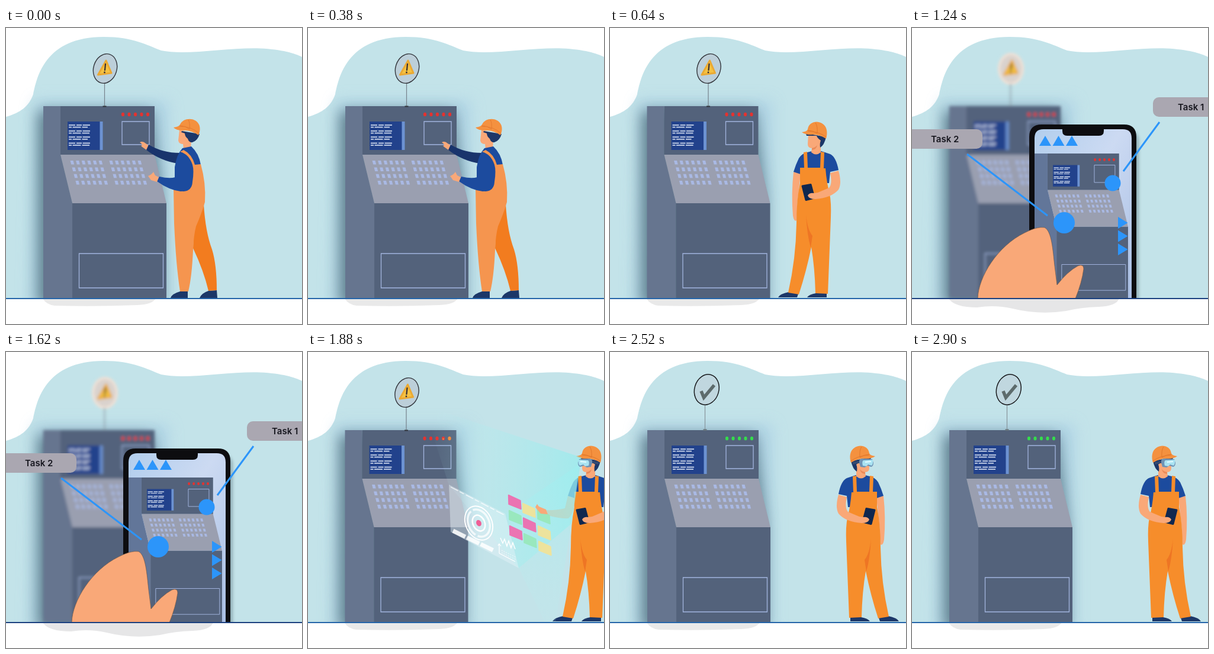
These frames come from a looping animation (500x500 px, 3160 ms). An HTML page:

```html
<!DOCTYPE html>
<html lang="en">
<head>
<meta charset="utf-8">
<title>Machine maintenance</title>
<style>
html, body { margin: 0; width: 100%; height: 100%; overflow: hidden; background: #fff; }
svg { display: block; width: 100vw; height: 100vh; }
.scene { visibility: hidden; animation: 3160ms step-end infinite; }
.operate { animation-name: operate; }
.inspect { animation-name: inspect; }
.phone { animation-name: phone; }
.headset { animation-name: headset; }
.done { animation-name: done; }
/* cuts at 640, 1240, 1880 and 2520 ms */
@keyframes operate { 0% { visibility: visible } 20.2532%, 100% { visibility: hidden } }
@keyframes inspect { 0% { visibility: hidden } 20.2532% { visibility: visible } 39.2405%, 100% { visibility: hidden } }
@keyframes phone { 0% { visibility: hidden } 39.2405% { visibility: visible } 59.4937%, 100% { visibility: hidden } }
@keyframes headset { 0% { visibility: hidden } 59.4937% { visibility: visible } 79.7468%, 100% { visibility: hidden } }
@keyframes done { 0% { visibility: hidden } 79.7468%, 100% { visibility: visible } }
.red { color: #e5322f; }
.green { color: #35dc4c; }
.skin { fill: #f9a878; }
.navy { fill: #1c3768; }
.shirt { fill: #1c4b9e; }
.suit { fill: #f68d2b; }
.cap { fill: #f4913f; }
.accent { fill: #2c95fa; }
text { font: 600 15px Inter, "Open Sans", sans-serif; fill: #17171f; }
</style>
</head>
<body>
<svg viewBox="0 0 500 500">
<defs>
  <filter id="soft" x="-50%" y="-50%" width="200%" height="200%"><feGaussianBlur stdDeviation="12"/></filter>
  <filter id="blur" x="-20%" y="-20%" width="140%" height="140%"><feGaussianBlur stdDeviation="2.6"/></filter>
  <clipPath id="above"><path d="M0 0H500V456H0Z"/></clipPath>
  <clipPath id="display"><path d="M207 456V186Q207 171 222 171H356Q371 171 371 186V456Z"/></clipPath>
  <linearGradient id="glass" x2="1" y2="1"><stop stop-color="#b2ceed"/><stop offset=".45" stop-color="#ccdaf2"/><stop offset="1" stop-color="#a9bfe4"/></linearGradient>
  <linearGradient id="beam" gradientUnits="userSpaceOnUse" x1="462" y1="185" x2="205" y2="160">
    <stop stop-color="#8deeee" stop-opacity=".62"/><stop offset="1" stop-color="#b5f0f0" stop-opacity="0"/>
  </linearGradient>
  <linearGradient id="spill" gradientUnits="userSpaceOnUse" x1="458" y1="190" x2="385" y2="445">
    <stop stop-color="#9ceff0" stop-opacity=".5"/><stop offset="1" stop-color="#b8f0f0" stop-opacity=".12"/>
  </linearGradient>

  <g id="shadow" clip-path="url(#above)">
    <path d="M48 122H275V470H40Z" fill="#a9cfe4" opacity=".7" filter="url(#soft)"/>
    <path d="M54 140H245L262 290V470H54Z" fill="#40616d" opacity=".75" filter="url(#soft)"/>
  </g>
  <path id="base" d="M62 457H253Q247 467 222 468Q150 471 82 469Q68 467 62 457Z" fill="#e9e9e9"/>

  <g id="keys" fill="none" stroke="#a9b9e4" stroke-width="6.4" stroke-dasharray="5 4.6">
    <path d="M0 3.3H53M0 14.7H53M0 26H53M0 37.3H53"/>
  </g>
  <g id="machine">
    <path d="M63 132H92V214L112 296V456H63Z" fill="#66758f"/>
    <path d="M92 132H251V214H92ZM112 296H271V456H112Z" fill="#53627b"/>
    <path d="M92 214H251L271 296H112Z" fill="#9a9fb0"/>
    <path d="M104 158H159V206H104Z" fill="#22428c"/>
    <path d="M158.500 158H163.500V206H158.500Z" fill="#6c92d2"/>
    <g stroke="#e8effc" stroke-width="1.6" fill="none">
      <path d="M106 164H142M106 174H142M106 184.300H142M106 194.500H142" stroke-dasharray="11 2 9 1.500 12.500 0"/>
      <path d="M106 167.500H138M106 177.500H141M106 187.700H138M106 198H141" stroke-dasharray="5 1.500 14 2 12.500 0"/>
    </g>
    <g fill="none" stroke="#a3b5df" stroke-width="1.3">
      <path d="M196 158H242V197H196ZM123.500 381H265.500V439H123.500Z"/>
    </g>
    <g fill="currentColor">
      <ellipse cx="197.500" cy="146" rx="2.600" ry="3.300"/><ellipse cx="208" cy="146" rx="2.600" ry="3.300"/>
      <ellipse cx="218.500" cy="146" rx="2.600" ry="3.300"/><ellipse cx="229" cy="146" rx="2.600" ry="3.300"/>
      <ellipse cx="239.500" cy="146" rx="2.600" ry="3.300"/>
    </g>
    <g transform="translate(108.500 224) skewX(14.700)"><use href="#keys"/><use href="#keys" x="66"/></g>
  </g>

  <g id="sign">
    <path d="M166.500 94V132" stroke="#75808a" stroke-width="1.2"/>
    <path d="M163.500 132.500H169.500" stroke="#30343c" stroke-width="2"/>
    <ellipse cx="167.500" cy="68.500" rx="19.600" ry="25.300" transform="rotate(17 167.500 68.500)" fill="#bccfd9" stroke="#33363c" stroke-width="1.4"/>
  </g>
  <g id="warning">
    <path d="M169 55L178 76L155.500 79Z" fill="#f5c242" stroke="#eba932" stroke-width="3" stroke-linejoin="round"/>
    <path d="M168 61L167 71" stroke="#3a3034" stroke-width="2.300" stroke-linecap="round"/>
    <circle cx="166.500" cy="75" r="1.400" fill="#3a3034"/>
  </g>
  <g id="faulty">
    <use href="#base"/><use href="#shadow"/><use href="#machine"/><use href="#sign"/><use href="#warning"/>
  </g>
  <path id="floor" d="M0 457H500" stroke="#2565a9" stroke-width="2"/>

  <path id="arm" class="skin" d="M310 243Q306 280 309 317Q311 328 315 325Q317 312 316 300L322 246Z"/>
  <g id="worker">
    <path class="navy" d="M284 455Q287 449 302 446L318 449L316 455ZM333 455Q336 450 348 448L366 448V455Z"/>
    <path class="shirt" d="M341 208Q324 211 319 220Q314 230 310 243L322 247V262H370L372 243L386 240Q382 218 372 213L357 208Z"/>
    <path class="skin" d="M335 180L334 196Q334 203 341 203L340 210Q348 217 356 210V199Q363 191 355 188L349 181Z"/>
    <path d="M341 203Q347 202 350 198Q349 205 341 206Z" fill="#ea8a58"/>
    <path class="navy" d="M331 178L365 184Q362 198 355 202Q354 195 356 190Q350 186 349 182L332 182Z"/>
    <path class="suit" d="M327 210L333 209L334 236H355L356 209L362 210L361 237H364Q366 262 371 280Q374 295 373 320L368 449L347 448Q346 405 340 370Q332 410 319 450L301 447Q314 390 315 330Q315 290 321 262V236H328Z"/>
    <path d="M331 316Q333 350 339 371L342 351Q334 342 331 316Z" fill="#ee7524"/>
    <path class="cap" d="M324 176Q333 175 334 171C336 158 350 156 358 161C367 166 368 177 365 187Q354 180 343 180Q330 181 324 176Z"/>
    <path d="M334 173Q342 173 350 178Q351 166 347 160M334 174Q353 175 365 184" fill="none" stroke="#e2782c"/>
    <path d="M325 267L339 264.500L345 287L331 290.500Z" fill="#10284f" stroke="#10284f" stroke-width="3" stroke-linejoin="round"/>
    <path class="skin" d="M372 245L386 241Q392 262 386 273Q374 287 347 289Q336 289 334 283Q337 278 344 279L351 278L370 270Q376 263 372 245Z"/>
  </g>
  <g id="visor">
    <path d="M348 185L362 188" stroke="#344b72" stroke-width="4"/>
    <path d="M329 181L347 180Q352 181 351 187L349 194L342 195L337 192L331 194Q327 193 327 187Z" fill="#6e93b5"/>
    <path d="M328 182L344 183Q347 185 345 192L339 193L336 190L330 192Q327 189 328 182Z" fill="#a9e3f2"/>
    <path d="M331 185L341 186" stroke="#e4fbff" stroke-width="2"/>
  </g>
  <path id="tile" d="M-10 -11L9.500 -2L10.500 12L-9.500 4Z" stroke-width="2.400" stroke-linejoin="round"/>
</defs>

<path fill="#c3e3e9" d="M0 150C25 143 39 132 46 112C52 84 65 15 165 15C215 15 238 29 262 38C305 47 380 32 430 34.500C465 36 489 43 500 49V457H0Z"/>

<g class="scene operate red">
  <use href="#faulty"/><use href="#floor"/>
  <path class="navy" d="M278 456Q280 449 294 445L307 444V456ZM327 456Q330 448 342 444L356 443L357 456Z"/>
  <path fill="#f27c1f" d="M334 298Q337 345 348 374Q356 400 356 443L342 444Q334 410 316 372L318 310Z"/>
  <path class="skin" d="M226 193Q231 190 236 195L243 200L239 207Q231 202 228 199Q233 198 226 193Z"/>
  <path fill="#19346c" d="M241 197Q264 211 294 211L291 229Q262 225 237 206Z"/>
  <path class="skin" d="M293 172L291 190Q292 196 299 196L300 205L312 204L313 190L304 175Z"/>
  <path class="navy" d="M297 174L327 179Q324 190 315 193Q309 194 307 187Q302 183 302 178L296 176Z"/>
  <path class="shirt" d="M298 203L313 200Q326 212 329 231L321 266L312 276H285V235Q288 214 298 203Z"/>
  <path fill="#f5954f" d="M294 209L300 206Q314 213 319 231L329 230Q338 262 336 294Q331 312 321 335Q317 350 316 375Q314 420 308 445H294Q287 400 284 330L283 272L300 276Q314 275 315 260Q318 241 315 231Q309 213 294 209Z"/>
  <path class="shirt" d="M289 228Q301 209 312 226Q317 240 309 266Q306 276 295 276Q276 274 255 259L259 251Q276 255 286 252Z"/>
  <path class="skin" d="M240 250Q246 248 249 243L252 249L258 252L255 260L245 257Z"/>
  <path class="cap" d="M283 168Q292 167 294 163C298 153 313 151 321 157C329 163 329 173 325 181Q313 173 302 173Q288 174 283 168Z"/>
  <path d="M294 165Q303 165 310 171Q311 160 308 155M293 166Q313 166 326 178" fill="none" stroke="#e57b30"/>
</g>

<g class="scene inspect red">
  <use href="#faulty" x="-.5"/><use href="#floor"/><use href="#arm"/><use href="#worker"/>
</g>

<g class="scene phone red">
  <path d="M62 457H350Q345 470 315 471Q285 472 260 478Q215 485 170 474Q140 467 110 472Q72 472 62 457Z" fill="#e6e6e7"/>
  <use href="#shadow"/>
  <g clip-path="url(#above)">
    <ellipse cx="167" cy="69" rx="22" ry="27" fill="#efe2d8" filter="url(#blur)"/>
    <g filter="url(#blur)">
      <use href="#machine"/>
      <path d="M166.500 94V132" stroke="#87949c" stroke-width="1.500"/>
      <ellipse cx="167" cy="69" rx="18" ry="23" fill="#d9d2cd"/>
      <use href="#warning"/>
    </g>
    <rect x="204" y="172" width="179" height="310" rx="18" fill="#56727c" opacity=".45" filter="url(#blur)"/>
  </g>
  <path d="M198 457V184Q198 163 219 163H358Q379 163 379 184V457Z" fill="#0d0d10"/>
  <g clip-path="url(#display)">
    <path d="M207 171H371V457H207Z" fill="url(#glass)"/>
    <use href="#machine" transform="matrix(.76 0 0 .753 159 112.600)"/>
    <path d="M207 212H229V272L243.500 335V457H207Z" fill="#5d78a8" opacity=".4"/>
  </g>
  <path d="M254 163H324V174Q324 182 316 182H262Q254 182 254 174Z" fill="#0d0d10"/>
  <g class="accent">
    <path d="M225 182L235 199H215ZM247.500 182L257.500 199H237.500ZM270 182L280 199H260Z"/>
    <path d="M348 319L364.500 329L348 339ZM348 341.500L364.500 351.500L348 361.500ZM348 364L364.500 374L348 384Z"/>
    <circle cx="339" cy="262" r="13.500"/><circle cx="257" cy="329" r="18"/>
  </g>
  <path d="M93 213L229 317M418 159L357 242" stroke="#2c95fa" stroke-width="3"/>
  <path class="skin" d="M111 457C112 420 145 368 190 346Q211 335 224 337C236 343 238 375 241 402L245 434Q263 411 280 402Q290 398 290 407Q287 430 276 457Z" stroke="#705848" stroke-width=".7"/>
  <path d="M0 457H500" stroke="#1b407f" stroke-width="2"/>
  <g fill="#aaa7b1"><rect x="-20" y="171" width="139" height="33" rx="10"/><rect x="407" y="117" width="120" height="33" rx="10"/></g>
  <text x="32" y="193">Task 2</text><text x="449" y="139">Task 1</text>
</g>

<g class="scene headset red">
  <use href="#faulty" x="-.5"/>
  <g fill="#ef8a35"><ellipse cx="239" cy="146" rx="2.600" ry="3.300"/><circle cx="228.500" cy="147" r="1.300"/></g>
  <use href="#floor"/>
  <path class="skin" d="M439 243L434 264Q415 268 401 267L389 261L387 256L386 262Q383 263 389 270Q394 275 403 275Q424 282 440 281Q449 273 452 247Z"/>
  <use href="#worker" x="129"/>
  <path d="M462 178L195 90L238 225L356 365L445 290Z" fill="url(#beam)"/>
  <path d="M458 190L335 273L356 365L400 456H418L446 285Z" fill="url(#spill)"/>
  <use href="#visor" x="129"/>
  <path d="M238 224L333 273L356 365L241 304Z" fill="#e6f3f8" opacity=".43"/>
  <g fill="none" stroke="#fff">
    <path d="M241 228L331 275" stroke-width="1.400" stroke-dasharray="14 3 8 4" opacity=".8"/>
    <g transform="rotate(-25 288.500 289)">
      <ellipse cx="288.500" cy="289" rx="22" ry="30" stroke-width="2"/>
      <ellipse cx="288.500" cy="289" rx="17.500" ry="24" stroke-width="3.500" stroke-dasharray="45 4" opacity=".75"/>
      <ellipse cx="288.500" cy="289" rx="10" ry="14" stroke-width="2.500"/>
      <ellipse cx="288.500" cy="289" rx="4.200" ry="5.500" fill="#ef5f96" stroke="none"/>
    </g>
    <path d="M245 302L313 335" stroke-width="7" stroke-dasharray="23 3" opacity=".85"/>
    <path d="M325 314L329 323L332 316L336 328L339 319L343 331L346 322L350 333" stroke-width="1.500"/>
    <path d="M323 324V340M321 327L323 324L326 328M323 340L350 354" stroke-width="1.200"/>
    <path d="M327 335L352 347M327 339L352 351" stroke-width="1" stroke-dasharray="2 2" opacity=".7"/>
  </g>
  <g opacity=".92">
    <g fill="#f06aae" stroke="#f06aae"><use href="#tile" x="349" y="253"/><use href="#tile" x="374" y="291.500"/><use href="#tile" x="351" y="305"/></g>
    <g fill="#f3e397" stroke="#f3e397"><use href="#tile" x="373" y="267"/><use href="#tile" x="399" y="305"/><use href="#tile" x="400" y="331"/></g>
    <g fill="#98e8bb" stroke="#98e8bb"><use href="#tile" x="398" y="278"/><use href="#tile" x="350" y="279"/><use href="#tile" x="375" y="318"/></g>
  </g>
  <path class="skin" d="M384 262L387 257L390 261L402 266L405 274L393 273Z"/>
</g>

<g class="scene done green">
  <use href="#base"/><use href="#shadow"/><use href="#machine"/>
  <path d="M160.500 90V131" stroke="#87949b" stroke-width="1.200"/>
  <path d="M157.500 131.500H163.500" stroke="#6c7a80" stroke-width="2.500"/>
  <ellipse cx="163.300" cy="63.500" rx="20.500" ry="26" transform="rotate(16 163.300 63.500)" fill="#c0d7df" stroke="#17191c" stroke-width="1.500"/>
  <path d="M154 66L158.500 77L176 56" fill="none" stroke="#5d6b6c" stroke-width="5.500"/>
  <use href="#floor"/>
  <g transform="matrix(-1 0 0 1 772 0)"><use href="#arm"/><use href="#worker"/><use href="#visor"/></g>
</g>
</svg>
</body>
</html>
```
